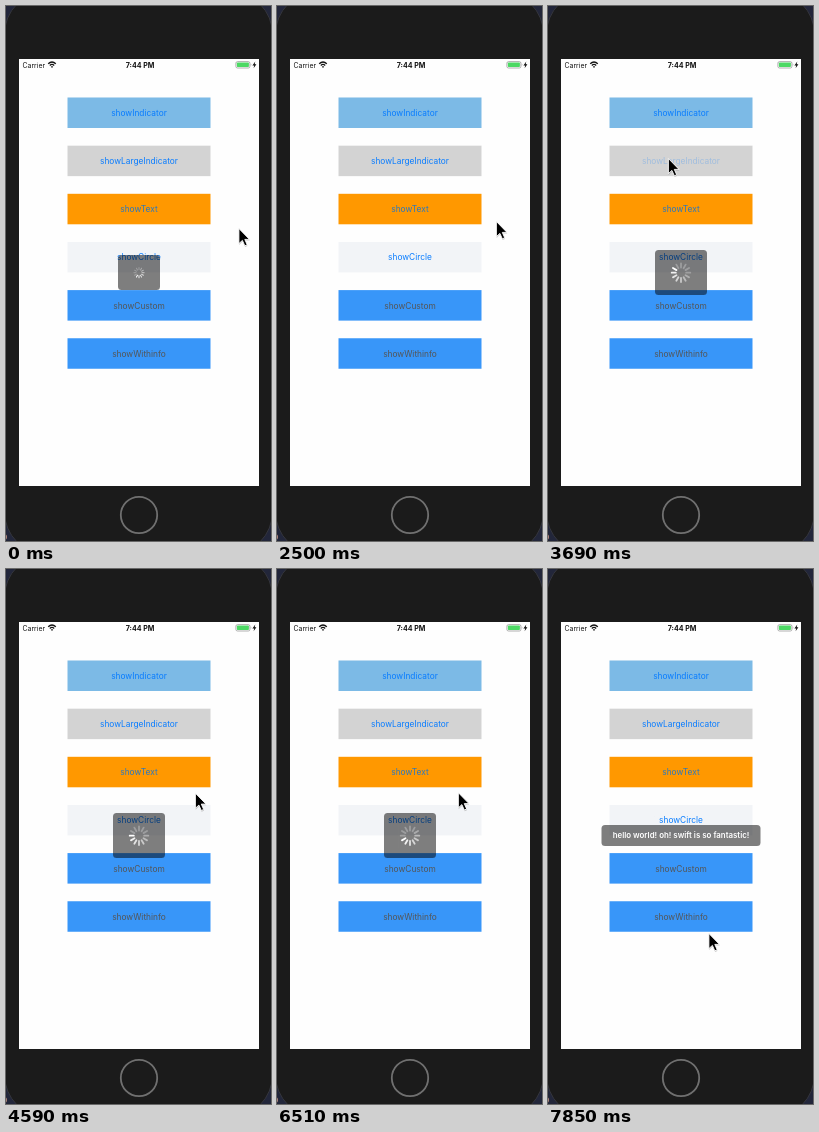
These frames come from a looping animation (265 by 535 pixels, 8000 ms). An HTML page:

```html
<!DOCTYPE html>
<html lang="en">
<head>
<meta charset="utf-8">
<style>
  html, body { margin: 0; width: 100%; height: 100%; overflow: hidden; background: #1b1b1b; }
  svg { display: block; width: 100vw; height: 100vh; }
  text { font-family: Inter, Roboto, sans-serif; }
  .label { font-size: 8.35px; text-anchor: middle; }
  .hud > rect { fill: #000; fill-opacity: .5; }
  .spoke { stroke: #fff; stroke-linecap: round; }
</style>
</head>
<body>
<svg viewBox="0 0 265 535" preserveAspectRatio="none">
  <rect width="265" height="535" fill="#22263a"/>
  <rect x="-1.5" y="-14" width="268" height="562" rx="42" fill="#1b1b1b" stroke="#34353c"/>
  <circle cx="-2" cy="531" r="3" fill="#b58b80"/>
  <rect x="13" y="53" width="240" height="427" fill="#fefefe"/>
  <circle cx="133" cy="509" r="18.2" fill="#1b1b1b" stroke="#707070" stroke-width="1.8"/>

  <text x="16.5" y="61.6" font-size="6.9" fill="#111">Carrier</text>
  <g fill="none" stroke="#111" stroke-width="1.3">
    <path d="M42.2 57.8Q46 54.2 49.8 57.8M43.8 59.4Q46 57.4 48.2 59.4"/>
    <path d="M46 62L44.8 60.6Q46 59.7 47.2 60.6Z" fill="#111" stroke="none"/>
  </g>
  <text x="134" y="61.6" font-size="7.1" font-weight="700" text-anchor="middle" fill="#111">7:44 PM</text>
  <rect x="229.9" y="55.6" width="14" height="6.4" rx="1.6" fill="none" stroke="#8f8f8f" stroke-width=".7"/>
  <rect x="230.9" y="56.6" width="12" height="4.4" rx=".7" fill="#4cd964"/>
  <path d="M244.8 57.6q1.2 1.2 0 2.4z" fill="#8f8f8f"/>
  <path d="M249.3 55.6L246.4 59.4H248.2L247.6 62.2L250.4 58.3H248.7Z" fill="#111"/>

  <g id="buttons"></g>

  <g id="smallHud" class="hud"><rect x="112" y="249" width="42" height="35" rx="3.5"/></g>
  <g id="largeHud" class="hud"><rect x="107" y="244" width="52" height="45" rx="3.5"/></g>
  <g id="textHud" class="hud">
    <rect x="53.5" y="256" width="159" height="21" rx="3.5"/>
    <text x="133" y="269.4" font-size="7.9" font-weight="600" text-anchor="middle" fill="#fff">hello world! oh! swift is so fantastic!</text>
  </g>

  <g id="cursor">
    <path d="M.6 1.6V17L4.2 13.6L6.6 19L9 18L6.6 12.6H11.4Z" fill="#000" opacity=".2"/>
    <path d="M.4 .5V15.6L3.9 12.4L6.3 17.8L8.7 16.8L6.3 11.4H11Z" fill="#000" stroke="#fff" stroke-width=".9"/>
  </g>
</svg>
<script>
const LOOP = 8000, STEP = 148;
const byId = id => document.getElementById(id);

function add(parent, tag, attrs, text = '') {
  const el = document.createElementNS('http://www.w3.org/2000/svg', tag);
  for (const key in attrs) el.setAttribute(key, attrs[key]);
  el.textContent = text;
  return parent.appendChild(el);
}

const labels = [
  ['showIndicator', '#7cbae6', '#087cff'],
  ['showLargeIndicator', '#d3d3d3', '#087cff'],
  ['showText', '#ff9800', '#2878c0'],
  ['showCircle', '#f2f4f7', '#087cff'],
  ['showCustom', '#3896f9', '#555'],
  ['showWithinfo', '#3896f9', '#555']
].map(([name, fill, color], i) => {
  const y = 91.5 + i * 48.15;
  add(byId('buttons'), 'rect', { x: 61.5, y, width: 143, height: 30.5, fill });
  return add(byId('buttons'), 'text', { x: 133, y: y + 18.4, fill: color, class: 'label' }, name);
});

function makeSpinner(hud, inner, outer, width, startAngle) {
  const spokes = Array.from({ length: 12 }, (_, i) => add(hud, 'line', {
    class: 'spoke', 'stroke-width': width, y1: -inner, y2: -outer,
    transform: `translate(133 266.7) rotate(${i * 30})`
  }));
  return time => {
    const lead = Math.floor(time * 12 / 1000 + startAngle / 30);
    spokes.forEach((spoke, i) => {
      const age = (((lead - i) % 12) + 12) % 12;
      spoke.setAttribute('opacity', Math.max(.27, 1 - age * .105));
    });
  };
}
const spinSmall = makeSpinner(byId('smallHud'), 3, 5.1, 1, 210);
const spinLarge = makeSpinner(byId('largeHud'), 5.2, 9.3, 1.8, 60);

// Cursor moves: first step, last step, destination
const start = [232.5, 222];
const moves = [
  [16, 17, 219, 215],
  [17, 23, 120, 152],
  [27, 32, 197, 232],
  [32, 34, 203.5, 238],
  [42, 47, 139.5, 196],
  [50, 53, 160.5, 364]
];
const ease = p => p * p * (3 - 2 * p);

function cursorAt(step) {
  let [x, y] = start;
  for (const [from, to, endX, endY] of moves) {
    if (step <= from) break;
    const p = ease(Math.min(1, (step - from) / (to - from)));
    x += (endX - x) * p;
    y += (endY - y) * p;
  }
  return [x, y];
}

const shown = (step, from, to) => step < from || step > to ? 0 : step === to ? .4 : 1;
const pressed = (step, at) => step === at ? .25 : step === at + 1 ? .75 : 1;

function draw(now) {
  const step = Math.floor((now % LOOP) / STEP + .12);
  const time = step * STEP;
  spinSmall(time);
  spinLarge(time);
  byId('smallHud').setAttribute('opacity', shown(step, 0, 13));
  byId('largeHud').setAttribute('opacity', shown(step, 25, 45));
  byId('textHud').setAttribute('opacity', shown(step, 49, 60));
  labels[1].setAttribute('opacity', pressed(step, 25));
  labels[2].setAttribute('opacity', pressed(step, 49));
  byId('cursor').setAttribute('transform', `translate(${cursorAt(step)})`);
}

const origin = performance.now();
function tick() {
  draw(performance.now() - origin);
  requestAnimationFrame(tick);
}
tick();
</script>
</body>
</html>
```
